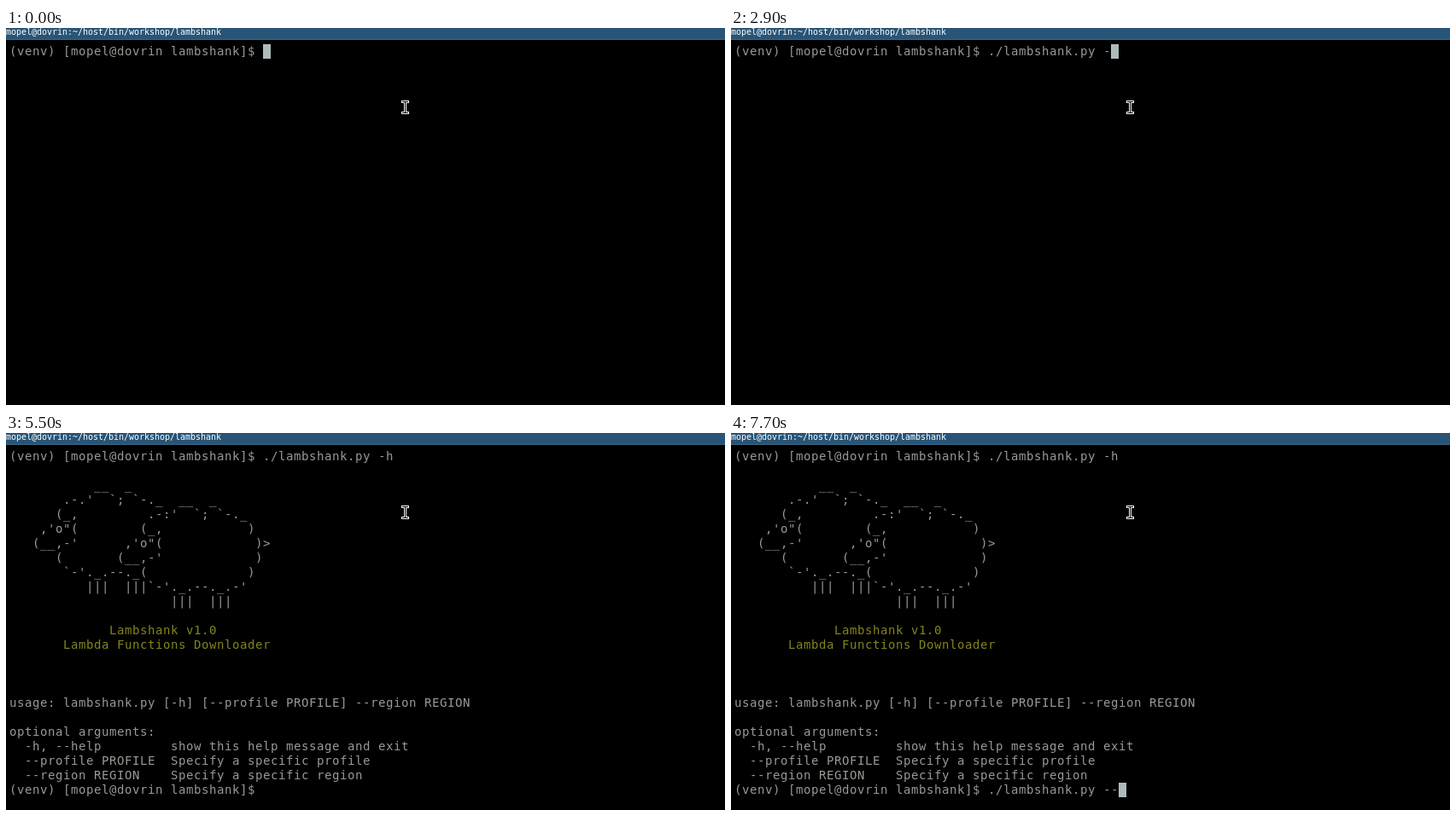
An HTML page for the animation above (8 s loop, 842 by 442 pixels).

```html
<!DOCTYPE html>
<html lang="en">
<head>
<meta charset="utf-8">
<title>Terminal session</title>
<style>
  html, body { margin: 0; width: 100%; height: 100%; overflow: hidden; background: #000; }
  svg { display: block; width: 842px; height: 442px; }
  text { font-family: "DejaVu Sans Mono", monospace; white-space: pre; }
  .term { font-size: 14px; fill: #999994; }
  .olive { fill: #84841f; }
  .title { font-size: 10px; fill: #fff; }
</style>
</head>
<body>
<svg id="stage" viewBox="0 0 842 442" xmlns="http://www.w3.org/2000/svg">
  <rect width="842" height="442" fill="#000"/>
  <rect width="842" height="13" fill="#285577"/>
  <rect y="13" width="842" height="1" fill="#41667f"/>
  <g id="screen"></g>
  <rect id="cursor" width="9" height="17" fill="#aebbbb"/>
  <g fill="none" stroke-linecap="square">
    <path id="beam" d="M464.5 86.5H470.5M467.5 86.5V99.5M464.5 99.5H470.5" stroke="#fff" stroke-width="3"/>
    <use href="#beam" style="display:none"/>
    <path d="M464.5 86.5H470.5M467.5 86.5V99.5M464.5 99.5H470.5" stroke="#000"/>
  </g>
</svg>
<script>
const LOOP = 8000, CELL_W = 9, CELL_H = 17, LEFT = 4, TOP = 19;
const LAST_ROW = 23, BLINK = 500;
const PROMPT = '(venv) [mopel@dovrin lambshank]$ ';
const SCRIPT = './lambshank.py ';
const OUTPUT = String.raw`
           __  _
       .-.'  ${'`'}; ${'`'}-._  __  _
      (_,         .-:'  ${'`'}; ${'`'}-._
    ,'o"(        (_,           )
   (__,-'      ,'o"(            )>
      (       (__,-'            )
       ${'`'}-'._.--._(             )
          |||  |||${'`'}-'._.--._.-'
                     |||  |||

             Lambshank v1.0
       Lambda Functions Downloader



usage: lambshank.py [-h] [--profile PROFILE] --region REGION

optional arguments:
  -h, --help         show this help message and exit
  --profile PROFILE  Specify a specific profile
  --region REGION    Specify a specific region`.split('\n');

// [time, typed command]; each key press also restarts the cursor blink
const FIRST = [
  [-400, ''], [900, 1], [1100, 2], [1300, 3], [1400, 4], [1500, 5], [1600, 6],
  [1800, 7], [2000, 8], [2200, SCRIPT], [2900, SCRIPT + '-'], [3500, SCRIPT + '-h']
].map(([t, s]) => [t, typeof s === 'number' ? SCRIPT.slice(0, s) : s]);
const ENTER = 3700, PRINT = 3900;
const SECOND = [
  [PRINT, ''], [7000, SCRIPT + '-h'], [7100, SCRIPT + '-'], [7200, SCRIPT],
  [7400, SCRIPT + '-'], [7700, SCRIPT + '--']
];

const screen = document.getElementById('screen');
const cursor = document.getElementById('cursor');

function addText(cls, y) {
  const el = document.createElementNS('http://www.w3.org/2000/svg', 'text');
  el.setAttribute('class', cls);
  el.setAttribute('y', y);
  screen.append(el);
  return el;
}

// Place every character on the fixed terminal grid
function write(el, str, left = LEFT, pitch = CELL_W) {
  if (el.textContent === str) return;
  el.setAttribute('x', Array.from(str, (_, i) => left + i * pitch).join(' '));
  el.textContent = str;
}

const baseline = row => TOP + row * CELL_H + 13;
const latest = (keys, t) => keys.filter(k => k[0] <= t).pop();

write(addText('title', 8), 'mopel@dovrin:~/host/bin/workshop/lambshank', 0, 6);
const lines = Array.from({ length: LAST_ROW + 1 }, (_, row) =>
  addText(row === 12 || row === 13 ? 'term olive' : 'term', baseline(row)));

function render(t) {
  const printed = t >= PRINT, waiting = t >= ENTER && !printed;
  const first = latest(FIRST, t);
  const second = printed ? latest(SECOND, t) : null;

  write(lines[0], PROMPT + first[1]);
  for (let row = 1; row < LAST_ROW; row++)
    write(lines[row], printed ? OUTPUT[row - 1] || '' : '');
  write(lines[LAST_ROW], printed ? PROMPT + second[1] : '');

  const [since, typed] = waiting ? [ENTER, ''] : second || first;
  const col = waiting ? 0 : PROMPT.length + typed.length;
  const row = printed ? LAST_ROW : waiting ? 1 : 0;
  cursor.setAttribute('x', LEFT + col * CELL_W);
  cursor.setAttribute('y', TOP + row * CELL_H);
  const lit = Math.floor((t - since) / BLINK) % 2 === 0;
  cursor.setAttribute('visibility', lit ? 'visible' : 'hidden');
}

const start = performance.now();
function tick() {
  render((performance.now() - start) % LOOP);
  requestAnimationFrame(tick);
}
render(0);
requestAnimationFrame(tick);
</script>
</body>
</html>
```
